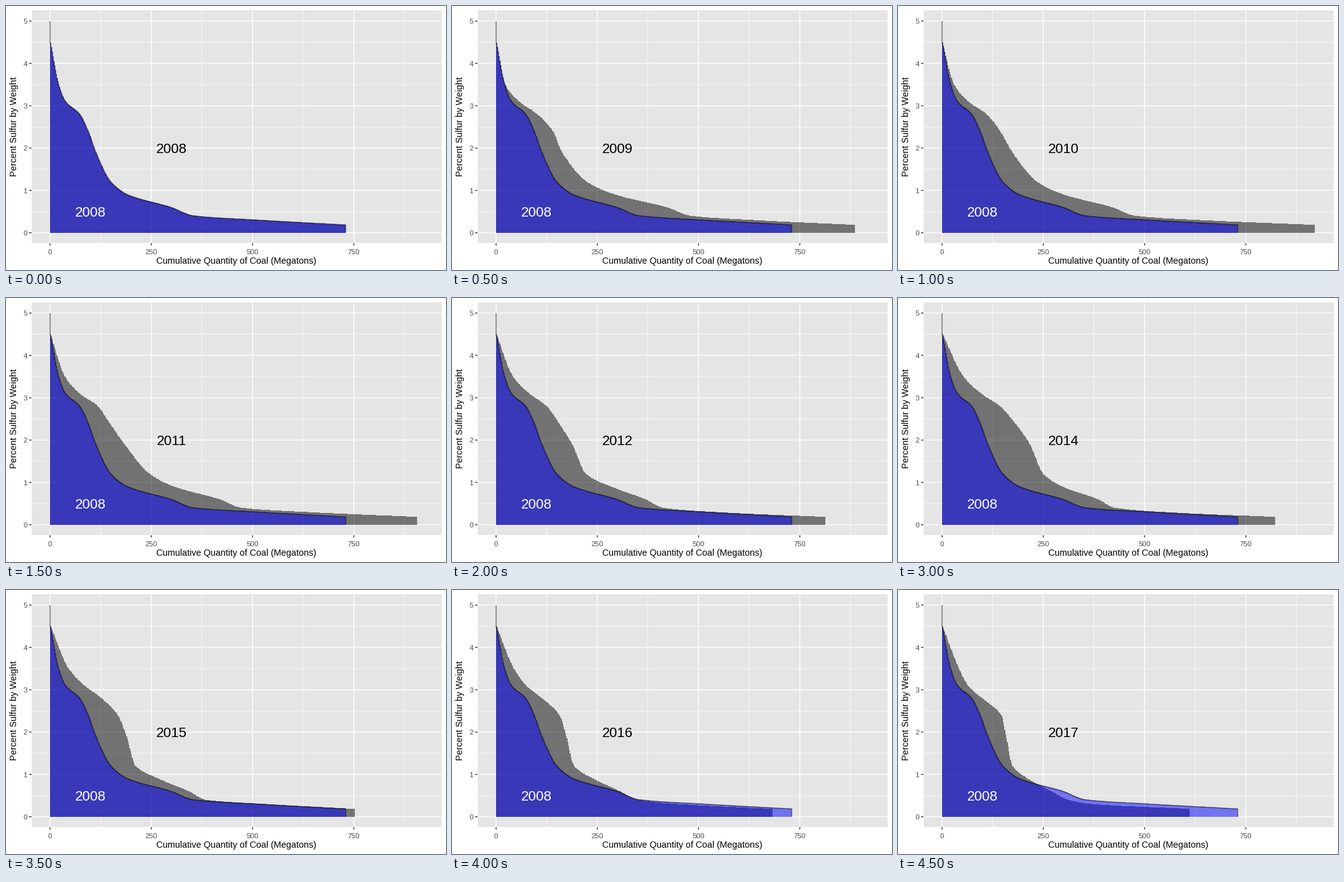
A matplotlib script that plays this animation: 700 by 420 pixels, repeating every 5 s.

```python
import numpy as np
import matplotlib.pyplot as plt
from matplotlib.animation import FuncAnimation
from matplotlib.patches import Polygon, Rectangle

W, H, DPI = 700, 420, 100
PT = 72 / DPI                      # points per pixel
LEFT, TOP, RIGHT, BOTTOM = 40.5, 7, 693, 377.4
X0, Y0, XS, YS = 70.15, 360.7, 0.6443, 67.35

plt.rcParams["font.family"] = "Liberation Sans"
fig = plt.figure(figsize=(W / DPI, H / DPI), dpi=DPI, facecolor="white")
ax = fig.add_axes([0, 0, 1, 1])
ax.set_xlim(0, W)
ax.set_ylim(H, 0)
ax.axis("off")


def sx(megatons):
    return X0 + megatons * XS


def sy(percent):
    return Y0 - percent * YS


def line(xs, ys, color, width, **kw):
    ax.plot(xs, ys, color=color, lw=width * PT, snap=False,
            solid_capstyle="butt", **kw)


def label(x, y, text, size, color="black", ha="center", **kw):
    return ax.text(x, y, text, fontsize=size * PT, color=color, ha=ha,
                   va="baseline", zorder=6, **kw)


def draw_axes():
    ax.add_patch(Rectangle((LEFT, TOP), RIGHT - LEFT, BOTTOM - TOP,
                           fc="#e5e5e5", lw=0, zorder=0))
    for q in range(0, 876, 125):
        line([sx(q)] * 2, [TOP, BOTTOM], "white", 0.7 if q % 250 else 1.4,
             zorder=1)
    for p in np.arange(0, 5.1, 0.5):
        line([LEFT, RIGHT], [sy(p)] * 2, "white", 0.7 if p % 1 else 1.4,
             zorder=1)
    for q in range(0, 751, 250):
        line([sx(q)] * 2, [BOTTOM, BOTTOM + 3.6], "#333333", 1.4)
        label(sx(q), 394.6, str(q), 11.45, "#4d4d4d")
    for p in range(6):
        line([LEFT - 3.6, LEFT], [sy(p)] * 2, "#333333", 1.4)
        label(33.8, sy(p) + 4.2, str(p), 11.45, "#4d4d4d", ha="right")
    label(366.6, 410, "Cumulative Quantity of Coal (Megatons)", 14.3)
    label(17.5, 192, "Percent Sulfur by Weight", 14.3,
          rotation=90, rotation_mode="anchor")


def smooth(x, xk, yk):
    """Cubic through the key points that never overshoots them."""
    h = np.diff(xk)
    d = np.diff(yk) / h
    m = np.concatenate([d[:1], 2 * d[1:] * d[:-1] / (d[1:] + d[:-1]), d[-1:]])
    k = np.clip(np.searchsorted(xk, x) - 1, 0, len(h) - 1)
    t = (x - xk[k]) / h[k]
    ease = t * t * (3 - 2 * t)
    bend = t * (1 - t) * ((1 - t) * m[k] - t * m[k + 1])
    return yk[k] + ease * (yk[k + 1] - yk[k]) + h[k] * bend


# Sulfur levels at which each year's curve has a key point.
LEVELS = np.array([4.53, 3.5, 3.1, 2.8, 2.4, 1.9, 1.2, 0.9, 0.6, 0.4, 0.3,
                   0.185])


def year_keys(*megatons):
    return np.array((0,) + megatons, float)


def between(a, b, total):
    mid = (a + b) / 2
    mid[-1] = total
    return mid


def outline(keys):
    """Staircase of small deliveries, ending on the baseline."""
    q = np.append(np.arange(1, keys[-1], 2), keys[-1])
    p = smooth(q, keys, LEVELS)
    edges = np.concatenate([[0], (q[1:] + q[:-1]) / 2, q[-1:]])
    px = np.append(np.repeat(edges, 2)[:-1], edges[-1])
    py = np.concatenate([[5], np.repeat(p, 2), [0]])
    return np.column_stack([sx(px), sy(py)])


def closed(points):
    return np.vstack([points, [X0, Y0]])


k08 = year_keys(21, 38, 73, 94, 113, 150, 191, 298, 354, 512, 730)
k09 = year_keys(23, 57, 102, 140, 163, 225, 295, 422, 481, 636, 886)
k11 = year_keys(37, 73, 118, 147, 184, 246, 307, 419, 473, 636, 906)
k12 = year_keys(42, 82, 125, 155, 188, 222, 284, 369, 413, 543, 813)
k14 = year_keys(53, 96, 143, 180, 217, 250, 298, 385, 427, 551, 822)
k15 = year_keys(46, 85, 127, 167, 189, 211, 268, 343, 385, 531, 752)
k17 = year_keys(42, 64, 99, 146, 158, 174, 212, 270, 312, 369, 612)

outlines = [outline(k) for k in (
    k08, k09, between(k09, k11, 920), k11, k12, between(k12, k14, 807),
    k14, k15, between(k15, k17, 682), k17)]
base = outlines[0]

draw_axes()
area = Polygon(closed(base), fc="black", alpha=0.5, lw=0, zorder=3)
ax.add_patch(area)
ax.add_patch(Polygon(closed(base), fc="blue", alpha=0.5, lw=0, zorder=4))
line(base[:, 0], base[:, 1], "black", 1.3, alpha=0.6, zorder=5)
label(sx(100), 335.4, "2008", 22, "white")
year = label(sx(300), 234.3, "2008", 22)


def update(i):
    area.set_xy(closed(outlines[i]))
    year.set_text(str(2008 + i))
    return area, year


anim = FuncAnimation(fig, update, frames=len(outlines), interval=500,
                     repeat=True, repeat_delay=0)
plt.show()
```
